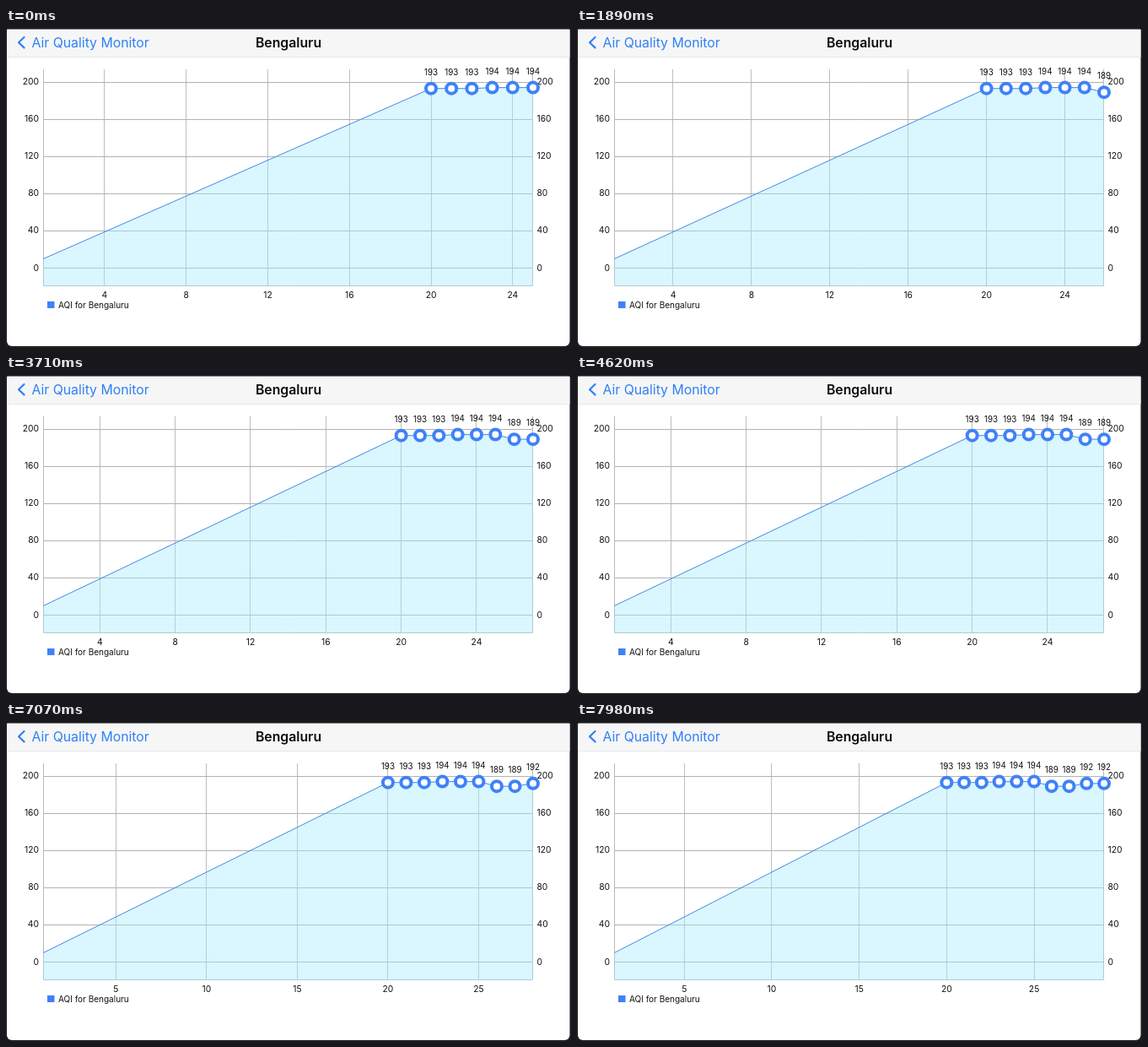
Write an HTML page with a canvas that moves like this. It is 670 px wide and 378 px high and loops after 8 s.

```html
<!DOCTYPE html>
<html lang="en">
<head>
<meta charset="utf-8">
<title>Air quality chart</title>
<style>
  html, body { margin: 0; width: 100%; height: 100%; overflow: hidden; background: #1d1d1f; }
  canvas { display: block; width: 670px; height: 378px; }
</style>
</head>
<body>
<canvas id="stage" width="670" height="378"></canvas>
<script>
const ctx = document.getElementById('stage').getContext('2d');
const LOOP = 8000;
const BLUE = '#3f82f7';
const PLOT = { left: 44, right: 625, top: 49, bottom: 306 };
// One reading per hour, starting at hour 20.
const READINGS = [193, 193, 193, 194, 194, 194, 189, 189, 192, 192];
const ARRIVALS = [910, 3080, 5110, 7980];

const yOf = v => 284.5 - v * 1.1025;
const crisp = v => Math.floor(v) + 0.5;

function text(str, x, y, align = 'left', size = 10, weight = 400, color = '#111') {
  ctx.font = `${weight} ${size}px Inter, "Liberation Sans", sans-serif`;
  ctx.textAlign = align;
  ctx.fillStyle = color;
  ctx.fillText(str, x, y);
}

function path(points, color, width) {
  ctx.beginPath();
  points.forEach(([x, y]) => ctx.lineTo(x, y));
  ctx.strokeStyle = color;
  ctx.lineWidth = width;
  ctx.stroke();
}

function drawScreen() {
  ctx.fillStyle = '#1d1d1f';
  ctx.fillRect(0, 0, 670, 378);
  ctx.fillStyle = '#fff';
  ctx.beginPath();
  ctx.roundRect(1, 1.5, 667.5, 375.5, [1, 1, 6, 6]);
  ctx.fill();
  ctx.fillStyle = '#f6f6f7';
  ctx.fillRect(1, 2, 667.5, 32);
  ctx.fillStyle = '#e4e8ea';
  ctx.fillRect(1, 34, 667.5, 1);

  ctx.lineCap = ctx.lineJoin = 'round';
  path([[21.5, 11], [15, 17.2], [21.5, 23.4]], '#2f80f5', 2.2);
  ctx.lineCap = 'butt';
  text('Air Quality Monitor', 30.5, 22.8, 'left', 15.8, 400, '#2f80f5');
  text('Bengaluru', 335, 22.8, 'center', 15.8, 600, '#0b0b0b');
}

function drawChart(count) {
  const { left, right, top, bottom } = PLOT;
  const last = 19 + count;
  const xOf = h => left + 0.3 + (h - 1) / (last - 1) * (right - left - 0.3);
  const step = last < 28 ? 4 : 5;

  for (let h = step; h < last; h += step) {
    const x = crisp(xOf(h));
    path([[x, top], [x, bottom]], '#bdbdbd', 1);
    text(h, xOf(h), 319.8, 'center', 10.3);
  }
  for (let v = 0; v <= 200; v += 40) {
    const y = crisp(yOf(v));
    path([[left, y], [right, y]], '#b2b2b2', 1);
    text(v, 39, yOf(v) + 3, 'right', 10.3);
    text(v, 629.5, yOf(v) + 3, 'left', 10.3);
  }
  path([[left + 0.5, top], [left + 0.5, bottom - 0.5], [right - 0.5, bottom - 0.5], [right - 0.5, top]], '#b8b8b8', 1);

  const dots = READINGS.slice(0, count).map((v, i) => [xOf(20 + i), yOf(v), v]);
  const curve = [[xOf(1), yOf(10)], ...dots];

  ctx.beginPath();
  curve.forEach(([x, y]) => ctx.lineTo(x, y));
  ctx.lineTo(right, bottom);
  ctx.lineTo(left, bottom);
  ctx.fillStyle = 'rgba(162, 233, 253, 0.4)';
  ctx.fill();
  path(curve, '#4189e6', 1);

  for (const [x, y, v] of dots) {
    ctx.beginPath();
    ctx.arc(x, y, 6, 0, Math.PI * 2);
    ctx.fillStyle = '#fff';
    ctx.fill();
    ctx.strokeStyle = BLUE;
    ctx.lineWidth = 4;
    ctx.stroke();
  }
  for (const [x, y, v] of dots) text(v, x, y - 16, 'center', 9.8);

  ctx.fillStyle = BLUE;
  ctx.fillRect(49, 324, 8.5, 8);
  text('AQI for Bengaluru', 62, 331.6);
}

function frame(now) {
  const t = now % LOOP;
  drawScreen();
  drawChart(6 + ARRIVALS.filter(a => t >= a).length);
  requestAnimationFrame(frame);
}
requestAnimationFrame(frame);
</script>
</body>
</html>
```
